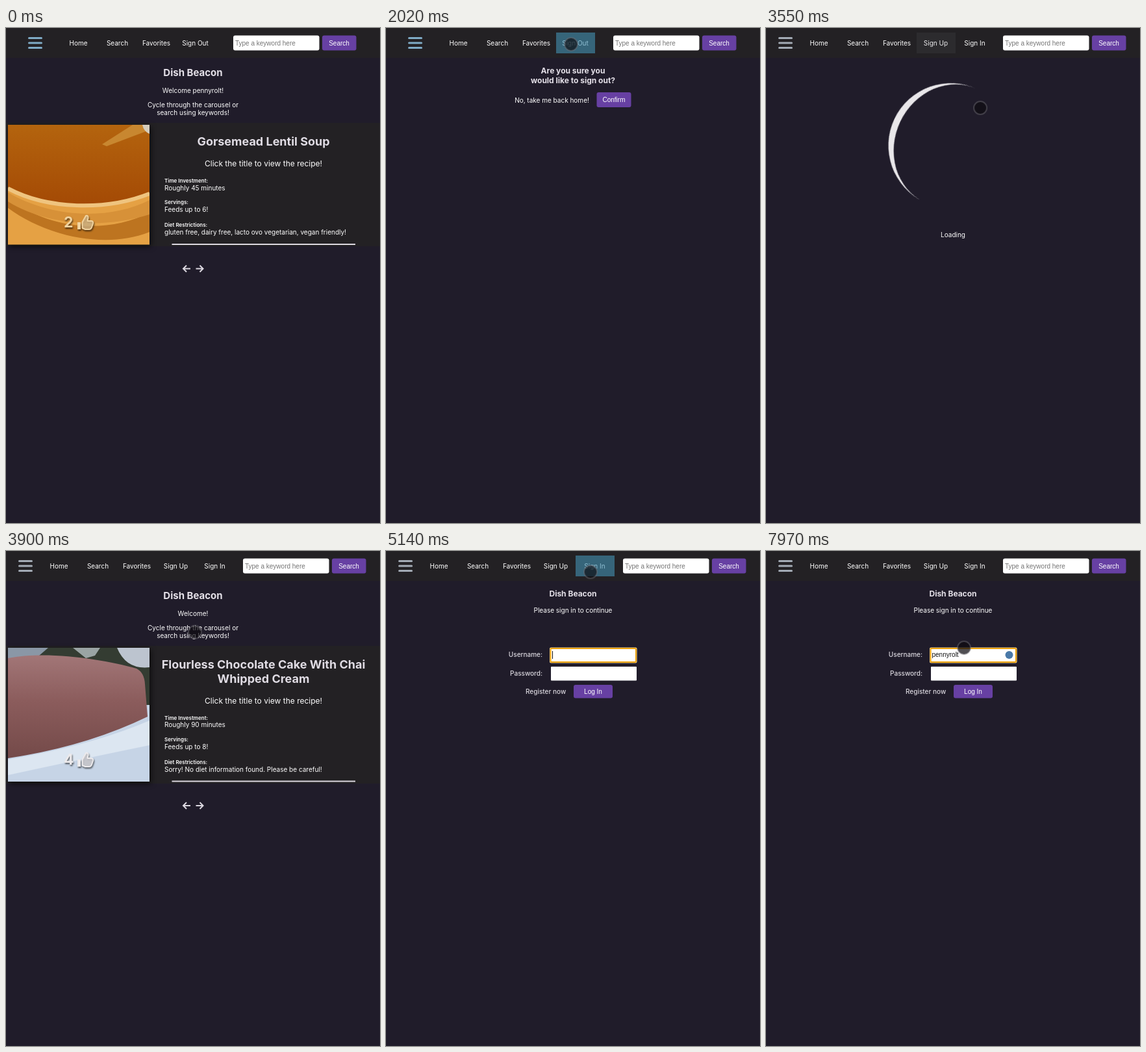
These frames come from a looping animation (576x762 px, 8000 ms). An HTML page:

```html
<!DOCTYPE html>
<html lang="en">
<head>
<meta charset="utf-8">
<title>Recipe carousel</title>
<style>
html, body { margin: 0; width: 100%; height: 100%; overflow: hidden; background: #201c2a; }
svg { display: block; }
text { font: 10px Inter, sans-serif; fill: #fff; }
.mid { text-anchor: middle; }
.end { text-anchor: end; }
.semi { font-weight: 500; fill: #dcd9e0; }
.h1 { font-size: 15px; font-weight: 700; fill: #e4e0e8; }
.h2 { font-size: 18px; font-weight: 700; fill: #e0dce4; }
.h3 { font-size: 12px; font-weight: 700; fill: #e4e0e8; }
.sub { font-size: 12px; }
.label { font-size: 8px; font-weight: 600; }
.likes { font-size: 23px; font-weight: 700; fill: inherit; }
.ui { font-family: "Liberation Sans", Arial, sans-serif; }
.hint { fill: #757575; }
.ink { fill: #111; }
.btn { fill: #6740a3; }
.bar { fill: #232124; }
.line { fill: none; stroke: #dcd8e0; stroke-width: 2; }
.shade { filter: drop-shadow(2px 3px 4px #000a); }
.badge { filter: drop-shadow(1px 2px 1px #0009); }

.scene { visibility: hidden; animation: 8s step-end infinite; }
.soup { animation-name: soup; }
.leave { animation-name: leave; }
.load { animation-name: load; }
.cake { animation-name: cake; }
.login { animation-name: login; }
.member { animation-name: member; }
.guest { animation-name: guest; }
.tip { animation-name: tip; }
.key { animation-name: key; }
@keyframes soup { 0% { visibility: visible } 25.25%, 100% { visibility: hidden } }
@keyframes leave { 0% { visibility: hidden } 25.25% { visibility: visible } 40.625%, 100% { visibility: hidden } }
@keyframes load { 0% { visibility: hidden } 40.625% { visibility: visible } 46.125%, 100% { visibility: hidden } }
@keyframes cake { 0% { visibility: hidden } 46.125% { visibility: visible } 61.75%, 100% { visibility: hidden } }
@keyframes login { 0% { visibility: hidden } 61.75%, 100% { visibility: visible } }
@keyframes member { 0% { visibility: visible } 40.625%, 100% { visibility: hidden } }
@keyframes guest { 0% { visibility: hidden } 40.625%, 100% { visibility: visible } }
@keyframes tip { 0% { visibility: hidden } 69.5% { visibility: visible } 82.25%, 100% { visibility: hidden } }
@keyframes key { 0% { visibility: hidden } 69.5%, 100% { visibility: visible } }

.spin { animation: spin 1s linear infinite; }
@keyframes spin { from { transform: rotate(-173deg) } to { transform: rotate(187deg) } }

/* tap highlight: blue flash, grey hover, fade out */
.tap { animation: tap-x 8s step-end infinite, tap 8s linear infinite; }
@keyframes tap-x {
  0% { transform: translateX(262px) }
  40.625% { transform: translateX(232px) }
  61.75%, 100% { transform: translateX(292px) }
}
@keyframes tap {
  0%, 25.24% { fill: #4493b4; opacity: 0 }
  25.25%, 29% { fill: #4493b4; opacity: .6 }
  29.01%, 40.625% { fill: #6b6a72; opacity: .7 }
  45.25% { fill: #6b6a72; opacity: 0 }
  61.74% { fill: #4493b4; opacity: 0 }
  61.75%, 65.5% { fill: #4493b4; opacity: .6 }
  65.51%, 74.5% { fill: #6b6a72; opacity: .7 }
  79%, 100% { fill: #6b6a72; opacity: 0 }
}

.touch { stroke: #77757c70; stroke-width: 2; animation: move 8s linear infinite, press 8s step-end infinite; }
@keyframes move {
  0%, 1.62% { transform: translate(517px, 790px) }
  1.625% { transform: translate(517px, 750px) }
  2.5% { transform: translate(480px, 665px) }
  5.125% { transform: translate(357px, 115px) }
  6% { transform: translate(350px, 47px) }
  6.875% { transform: translate(336px, -2px) }
  7.6% { transform: translate(320px, -15px) }
  9.3% { transform: translate(290px, -15px) }
  9.375% { transform: translate(288px, 0) }
  11.25% { transform: translate(288px, 20px) }
  13% { transform: translate(288px, 33px) }
  16.1%, 19.3% { transform: translate(288px, 21px) }
  19.4%, 21.8% { transform: translate(288px, 20px) }
  22.75%, 26% { transform: translate(285px, 25px) }
  33.75% { transform: translate(345px, 100px) }
  36%, 41% { transform: translate(357px, 115px) }
  44.4% { transform: translate(330px, 123px) }
  48.75% { transform: translate(291px, 125px) }
  55.5% { transform: translate(316px, 23px) }
  59%, 62% { transform: translate(315px, 25px) }
  64.25% { transform: translate(315px, 32px) }
  71%, 100% { transform: translate(305px, 149px) }
}
@keyframes press {
  0% { fill: #0c0a0fa8 }
  22.75% { fill: #5b5960d0 }
  25.25% { fill: #0c0a0fa8 }
  38.75% { fill: #5b5960d0 }
  40.625% { fill: #0c0a0fa8 }
  59.25% { fill: #5b5960d0 }
  61.75% { fill: #0c0a0fa8 }
  73.75% { fill: #5b5960d0 }
  78.1%, 100% { fill: #0c0a0fb8 }
}
</style>
</head>
<body>
<svg width="576" height="762" viewBox="0 0 576 762">
  <defs>
    <linearGradient id="broth" x2="0" y2="1">
      <stop stop-color="#b4640e"/>
      <stop offset="1" stop-color="#a44a05"/>
    </linearGradient>
    <linearGradient id="crumb" x2="0" y2="1">
      <stop stop-color="#a27677"/>
      <stop offset=".45" stop-color="#8b5c5c"/>
      <stop offset="1" stop-color="#744a49"/>
    </linearGradient>
    <path id="burger" d="M35.5 15.5h19M35.5 23h19M35.5 30.5h19" stroke-width="3" stroke-linecap="round"/>
    <g id="links" class="mid">
      <text x="111.5" y="27">Home</text>
      <text x="171.5" y="27">Search</text>
      <text x="231.5" y="27">Favorites</text>
    </g>
    <g id="find">
      <rect x="350" y="11.5" width="132.5" height="23" rx="3" fill="#fff"/>
      <text class="ui hint" x="353" y="27">Type a keyword here</text>
      <rect class="btn" x="487" y="11.5" width="52.5" height="23" rx="3"/>
      <text class="ui mid" x="513" y="27">Search</text>
    </g>
    <g id="intro" class="mid">
      <text class="h1" x="288" y="74">Dish Beacon</text>
      <text x="288" y="122">Cycle through the carousel or</text>
      <text x="288" y="134">search using keywords!</text>
    </g>
    <g id="info">
      <text class="sub mid" x="396.5" y="213">Click the title to view the recipe!</text>
      <text class="label" x="244" y="238">Time Investment:</text>
      <text class="label" x="244" y="271">Servings:</text>
      <text class="label" x="244" y="306">Diet Restrictions:</text>
      <path class="line" d="M255.5 333h282.5"/>
      <path class="line" d="M284 370.5h-11m5-5l-5 5 5 5M292.5 370.5h11m-5-5l5 5-5 5"/>
    </g>
    <g id="thumb">
      <path d="M110 299h5v11h-5z"/>
      <path d="M117.500 299l5.500-10q4-1 3.500 3.500l-1 4.500h5.500q4 0 3 4l-2 6q-1 3-4 3h-6l-4.500-2z"
        fill-opacity=".65" stroke="currentColor" stroke-width="2" stroke-linejoin="round"/>
    </g>
  </defs>

  <rect class="bar" width="576" height="46"/>
  <g class="scene member">
    <use href="#burger" stroke="#7fabc6"/>
    <use href="#links"/>
    <text class="mid" x="291.5" y="27">Sign Out</text>
    <use href="#find"/>
  </g>
  <g class="scene guest">
    <use href="#burger" x="-15" stroke="#a3abb5"/>
    <use href="#links" x="-30"/>
    <text class="mid" x="261.5" y="27">Sign Up</text>
    <text class="mid" x="321.5" y="27">Sign In</text>
    <use href="#find" x="15"/>
  </g>
  <rect class="tap" y="7" width="60" height="32"/>

  <g class="scene soup">
    <use href="#intro"/>
    <text class="mid" x="288" y="100">Welcome pennyrolt!</text>
    <rect class="bar" y="146" width="576" height="190"/>
    <rect class="shade" x="3" y="149" width="218" height="184.5" fill="#e5a144"/>
    <svg x="3" y="149" width="218" height="184.5">
      <path d="M0 112C60 160 150 170 218 135V165C150 192 60 172 0 128z" fill="#bd7420"/>
      <path d="M0 104C60 140 150 150 218 116V138C150 160 60 156 0 118z" fill="#d79138"/>
      <path d="M0 0H218V104C150 132 60 127 0 96z" fill="url(#broth)"/>
      <path d="M0 98C60 130 150 133 218 106" fill="none" stroke="#efc47f" stroke-width="6"/>
      <path d="M145 30L192 0H218V8L152 33z" fill="#c88730"/>
      <path d="M207 0h11v14q-9-4-11-14z" fill="#d5cdbd"/>
    </svg>
    <g class="badge" fill="#f0d3a0" color="#f0d3a0">
      <text class="likes" x="89" y="307">2</text>
      <use href="#thumb"/>
    </g>
    <text class="h2 mid" x="396.5" y="181">Gorsemead Lentil Soup</text>
    <text x="244" y="250">Roughly 45 minutes</text>
    <text x="244" y="283">Feeds up to 6!</text>
    <text x="244" y="318">gluten free, dairy free, lacto ovo vegetarian, vegan friendly!</text>
    <use href="#info"/>
  </g>

  <g class="scene leave mid">
    <text class="h3" x="288" y="70">Are you sure you</text>
    <text class="h3" x="288" y="85">would like to sign out?</text>
    <text x="255.5" y="115">No, take me back home!</text>
    <rect class="btn" x="324.5" y="99" width="53" height="23" rx="3"/>
    <text class="ui" x="351" y="114">Confirm</text>
  </g>

  <g class="scene load">
    <g transform="translate(284.5 181)">
      <path class="spin" d="M0-96A96 96 0 0 0 0 96A86 96 0 0 1 0-96" fill="#e9e7ea"/>
    </g>
    <text class="mid" x="288" y="322">Loading</text>
  </g>

  <g class="scene cake">
    <use href="#intro"/>
    <text class="mid" x="288" y="100">Welcome!</text>
    <rect class="bar" y="146" width="576" height="212"/>
    <rect class="shade" x="3" y="149" width="218" height="206" fill="#c6d4e6"/>
    <svg x="3" y="149" width="218" height="206">
      <rect width="218" height="100" fill="#343c32"/>
      <path d="M0 0H62L48 12 0 18z" fill="#8a97a6"/>
      <path d="M100 0h42l-8 12-14 4z" fill="#9aa4a4"/>
      <path d="M168 0H218V30Q182 34 168 0z" fill="#bcc4cf"/>
      <path d="M200 88h18V206H0V160z" fill="#c6d4e6"/>
      <path d="M0 172Q130 150 218 112V150Q120 170 0 196z" fill="#dce6f1"/>
      <path d="M0 16C60 4 150 18 198 32Q210 38 211 56L215 106Q120 152 0 170z" fill="url(#crumb)"/>
    </svg>
    <g class="badge" fill="#eceaec" color="#eceaec" transform="translate(0 22)">
      <text class="likes" x="89" y="307">4</text>
      <use href="#thumb"/>
    </g>
    <g class="mid">
      <text class="h2" x="396.5" y="181">Flourless Chocolate Cake With Chai</text>
      <text class="h2" x="396.5" y="203">Whipped Cream</text>
    </g>
    <text x="244" y="271">Roughly 90 minutes</text>
    <text x="244" y="305">Feeds up to 8!</text>
    <text x="244" y="340">Sorry! No diet information found. Please be careful!</text>
    <use href="#info" y="21.5"/>
  </g>

  <g class="scene login">
    <text class="h3 mid" x="288" y="70">Dish Beacon</text>
    <text class="mid" x="288" y="95">Please sign in to continue</text>
    <text class="semi end" x="241" y="163">Username:</text>
    <text class="semi end" x="241" y="192">Password:</text>
    <rect x="252" y="148.5" width="134.5" height="24" rx="2" fill="#fbe7b8"/>
    <rect x="253.5" y="150" width="131.5" height="21" rx="1" fill="#fff" stroke="#eda20c" stroke-width="2"/>
    <rect x="254" y="178" width="132" height="21.5" rx="1" fill="#fff"/>
    <text class="semi" x="215" y="220">Register now</text>
    <rect class="btn" x="289" y="206" width="60" height="20.5" rx="3"/>
    <text class="ui mid" x="319" y="220">Log In</text>
    <text class="ui ink" id="name" x="255.5" y="163"></text>
    <rect class="ink" id="caret" y="154" width="1" height="12"/>
  </g>
  <circle class="scene key" cx="374.5" cy="160" r="6" fill="#4a79a8"/>
  <g class="scene tip">
    <path d="M371 148h8l-4 5z"/>
    <rect x="320" y="127.5" width="109" height="21" rx="5"/>
    <text class="mid" x="374.5" y="142" style="font-size:10.5px">Unlock KeyGrotto</text>
  </g>

  <circle class="touch" r="10"/>
</svg>
<script>
const user = 'pennyrolt', firstKey = 6580, lastKey = 7510;
const field = document.getElementById('name');
const caret = document.getElementById('caret');

function typed(t) {
  if (t < firstKey) return 0;
  if (t >= lastKey) return user.length;
  return Math.min(user.length - 1, 1 + Math.floor((t - firstKey) / 104));
}

// The caret blinks after each focus and stays solid while typing
function caretOn(t) {
  if (t < 4940) return false;
  if (t >= firstKey) return t < 7970;
  return t < 5440 || (t >= 6110 && t < 6320);
}

function tick(now) {
  const t = now % 8000, text = user.slice(0, typed(t));
  if (field.textContent !== text) field.textContent = text;
  caret.setAttribute('x', 256 + (text ? Math.round(field.getComputedTextLength()) : 0));
  caret.style.opacity = caretOn(t) ? 1 : 0;
  requestAnimationFrame(tick);
}
requestAnimationFrame(tick);
</script>
</body>
</html>
```
